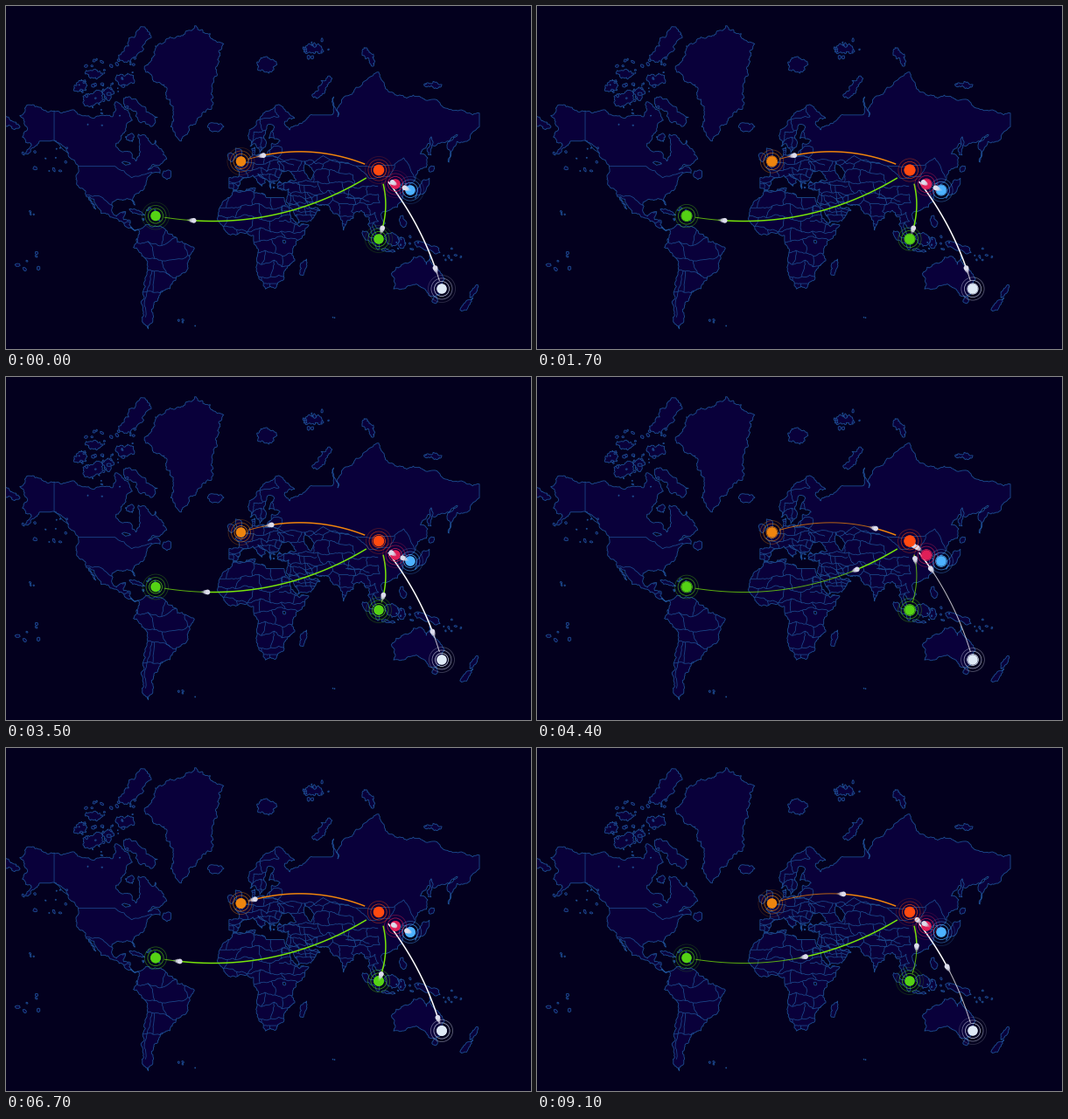
A matplotlib script that plays this animation: 600x393 px, repeating every 9200 ms.

```python
import math
import random

import matplotlib.pyplot as plt
import numpy as np
from matplotlib.animation import FuncAnimation
from matplotlib.collections import LineCollection, PolyCollection
from matplotlib.patches import Circle
from matplotlib.path import Path

W, H, DPI = 600, 393, 100
PX = 72 / DPI
FRAMES, STEP = 92, 100
SEA, LAND, EDGE = "#03001e", "#09003a", "#1d4f93"
rng = random.Random(7)

# Main coast points as lon, lat pairs; the fine coast is generated between them.
NORTH_AMERICA = [
    -141, 69.6, -125, 69.5, -115, 68.3, -97, 68, -95, 71.8, -85, 69.5, -82, 67, -87, 64.5,
    -94.5, 59, -92.5, 57, -82.5, 55, -79.5, 51.5, -76.6, 57, -77.5, 62.5, -70, 61, -66, 58.8,
    -64.5, 60.3, -56, 52.5, -66, 50, -70, 47.2, -65, 49, -61, 45.5, -70, 43.5, -76, 35.2,
    -81.3, 31, -80.1, 26, -84, 30, -97.3, 28, -97.7, 22.5, -94, 18.2, -90.4, 21, -87, 21.5,
    -88.5, 15.8, -83.5, 15, -83, 9.5, -77.3, 8.5, -80, 7.4, -92, 14.5, -105.5, 20.2,
    -114.7, 31.7, -109.6, 23.2, -117.2, 33, -124, 40, -122.7, 48, -134, 58, -144, 60, -152, 60,
    -163, 54.8, -158, 58.5, -165, 61.5, -161, 64.3, -167, 68.3, -157, 71.2]
SOUTH_AMERICA = [
    -77.3, 8.5, -72, 12, -62, 10.6, -52, 5, -48, -1, -35.2, -5.5, -39, -14, -41, -22, -48.6, -26,
    -53.5, -34, -57.5, -35, -62, -39, -67.5, -46, -68.3, -53, -70, -55.3, -74.5, -51.5, -73, -40,
    -70.3, -19, -81.2, -5, -77.5, 4]
EURASIA_NORTH = [
    -9, 37, -9, 43, -2, 43.4, -1.2, 46, -4.5, 48.4, 8.5, 53.8, 8.2, 57, 10.5, 57.6, 10, 54.3,
    19, 54.5, 23.5, 59.2, 29.5, 60, 21.3, 61, 25.2, 65, 22, 65.8, 17.3, 62, 18.8, 60, 14.2, 55.4,
    11, 59, 7, 58, 5.3, 62, 14.5, 67.8, 26, 71, 40.5, 67.6, 33, 66.6, 37, 64, 44, 66, 54, 68.5,
    68, 68.5, 70, 73, 73, 68, 76, 72, 87, 75, 104, 77.7, 113, 74, 127, 73, 139, 72.3, 160, 69.7,
    180, 69]
EURASIA_SOUTH = [
    180, 65, 171, 60, 163, 59.8, 157, 51, 156, 57, 163.5, 62.3, 154, 59.4, 142, 59.2, 135.5, 54.7,
    141, 53, 140, 48.5, 127.5, 39.6, 129.3, 36, 126.4, 34.5, 124.5, 40, 117.7, 39, 122, 37.2,
    121.8, 30, 118, 24.5, 108, 21.6, 105.8, 19, 109, 13, 105, 8.8, 100.5, 13.4, 99.3, 10,
    104.2, 1.4, 98.3, 8, 97, 17, 94, 18, 91, 22.4, 87, 21.4, 80.2, 15, 77.5, 8.1, 72.8, 20,
    66.7, 25.2, 57, 26.8, 48.5, 30, 51.5, 24.6, 59.8, 22.5, 55, 17.5, 43, 13, 34, 29, 36, 36.5,
    27.5, 37, 29, 41.1, 41.5, 41.5, 37.5, 46, 31, 46.6, 28, 41.5, 23.5, 40.5, 22.5, 36.6,
    19.3, 42, 12.7, 45, 18.4, 40.2, 15.8, 38.2, 9, 44.4, 3.2, 43, -2.2, 36.8]
AFRICA = [
    32.5, 31, 20, 31, 10.2, 34, 11, 37, -5.8, 35.8, -9.8, 31, -17, 21, -17.4, 14.7, -13, 8.8,
    -8, 4.4, 4.5, 6.3, 9.5, 4, 9.5, 0, 13.3, -7, 12, -15.5, 17, -30, 18.4, -34.2, 26, -33.8,
    32.7, -27, 35, -20, 40.6, -15, 39, -6, 48, 4.5, 51.2, 11.8, 44, 10.6, 37, 20, 33.5, 27.8]
AUSTRALIA = [
    142.5, -10.8, 146, -19, 153.5, -28, 150, -37.5, 143.5, -38.7, 138, -34, 131, -31.5,
    123.5, -34, 115.2, -34.2, 113.6, -24, 122.3, -17.5, 130, -12.5, 136.8, -12.2, 140, -17.6]
GREENLAND = [
    -73, 78.2, -58, 75.5, -51, 68.5, -53, 65, -45, 60, -39.5, 65, -22, 70.3, -19, 77, -13, 81.5,
    -35, 83.3, -62, 81.5]
BORDERS = [
    [-141, 69.6, -141, 60.3, -130, 55], [-123, 49, -95, 49, -82.5, 43, -71, 45.2, -67, 46],
    [-117, 32.5, -106, 31.7, -97.3, 26], [-67, -22, -72, -50],
    [23.5, 54, 31, 52, 40, 49.5], [47, 48, 62, 54, 87, 49.2, 116, 49.8, 123, 53, 131, 43],
    [87, 49.2, 97, 42.7, 112, 43.5, 116, 49.8], [79, 31, 97, 28.3]]

# Islands: x, y, half width, half height, tilt in degrees
ARCTIC_ISLES = [
    (155, 122, 23, 9, 38), (100, 107, 12, 9, 5), (86, 92, 7, 7, 0), (148, 46, 27, 12, -52),
    (137, 84, 12, 6, 0), (100, 78, 10, 5, 0), (117, 101, 6, 7, 0), (142, 150, 5, 4, 0),
    (297, 68, 10, 10, 0), (361, 94, 17, 5, -50), (352, 50, 13, 6, 0), (415, 58, 5, 11, -30),
    (488, 90, 9, 3, 0), (3, 134, 12, 5, 15)]
ISLES = [
    (240, 138, 9, 5, 0), (266, 173, 4, 11, -18), (257, 173, 4, 5, 0), (184, 193, 5, 5, 0),
    (149, 236, 9, 1.6, 20), (340, 299, 4, 11, 20), (490, 337, 3, 4, 0), (535, 327, 3, 8, 30),
    (526, 342, 3, 10, 45), (482, 277, 15, 5, 22), (441, 267, 8, 8, 0), (419, 269, 4, 15, -45),
    (436, 280, 8, 1.8, 8), (452, 272, 4, 6, 0), (453, 247, 3, 8, -15), (477, 207, 3.5, 14, 35),
    (486, 187, 4, 4, 0), (485, 162, 2, 11, 5)]
# Islet groups: x, y, spread, count
GROUPS = [(118, 80, 30, 26), (112, 112, 36, 16), (355, 48, 18, 12), (460, 274, 14, 12),
          (508, 284, 12, 8), (165, 238, 12, 9), (45, 172, 26, 12), (306, 205, 5, 6),
          (28, 292, 16, 6), (30, 237, 4, 3), (205, 366, 12, 4), (374, 356, 2, 2)]
# Areas filled with small states: left, top, right, bottom, cell size
STATES = [(240, 204, 352, 330, 13), (252, 163, 316, 212, 8), (312, 178, 392, 246, 12),
          (146, 250, 214, 332, 19), (394, 208, 424, 252, 10), (280, 112, 306, 164, 14),
          (130, 230, 152, 262, 9)]


def project(flat):
    lon, lat = np.array(flat, float).reshape(-1, 2).T
    y = 269 - 86.75 * np.log(np.tan(np.pi / 4 + np.radians(lat) / 2))
    return np.column_stack([268.5 + 1.514 * lon, y])


def roughen(points, levels=4, amount=0.22, closed=True):
    """Break each straight run into a jagged one by midpoint displacement."""
    pts = [tuple(p) for p in points]
    if closed:
        pts.append(pts[0])
    for _ in range(levels):
        out = [pts[0]]
        for (x0, y0), (x1, y1) in zip(pts, pts[1:]):
            length = math.hypot(x1 - x0, y1 - y0)
            if length > 1.5:
                seam = abs(x0 - x1) < 0.01 or abs(y0 - y1) < 0.01
                k = 0 if seam else rng.uniform(-1, 1) * min(amount, 3 / length)
                out.append(((x0 + x1) / 2 + k * (y1 - y0), (y0 + y1) / 2 - k * (x1 - x0)))
            out.append((x1, y1))
        pts = out
    return pts


def blob(x, y, rx, ry, tilt=0, sides=8):
    c, s = math.cos(math.radians(tilt)), math.sin(math.radians(tilt))
    for i in range(sides):
        k, a = rng.uniform(0.75, 1.2), math.tau * i / sides
        u, v = k * rx * math.cos(a), k * ry * math.sin(a)
        yield x + u * c - v * s, y + u * s + v * c


def islets(x, y, spread, count):
    for _ in range(count):
        r = rng.uniform(0.4, 2 if spread > 15 else 1.2)
        yield list(blob(x + rng.uniform(-spread, spread), y + rng.uniform(-spread, spread) * 0.7,
                        r * rng.uniform(0.7, 1.8), r, rng.uniform(0, 90), 6))


def state_lines(left, top, right, bottom, cell):
    """Jittered brick pattern: joined rows, with a wall at every second column."""
    cols, rows = round((right - left) / cell) + 1, round((bottom - top) / cell) + 1
    node = [[(left + cell * (c + rng.uniform(-0.33, 0.33)), top + cell * (r + rng.uniform(-0.33, 0.33)))
             for c in range(cols)] for r in range(rows)]
    for r in range(rows):
        for c in range(cols):
            if c + 1 < cols:
                yield roughen([node[r][c], node[r][c + 1]], 3, 0.15, False)
            if r + 1 < rows and (r + c) % 2 == 0:
                yield roughen([node[r][c], node[r + 1][c]], 3, 0.15, False)


fig = plt.figure(figsize=(W / DPI, H / DPI), dpi=DPI, facecolor=SEA)
ax = fig.add_axes([0, 0, 1, 1])
ax.set_xlim(0, W)
ax.set_ylim(H, 0)
ax.axis("off")


def add_areas(areas, fill, z):
    ax.add_collection(PolyCollection(areas, facecolor=fill, edgecolor=EDGE, linewidth=0.85 * PX, zorder=z))


def add_borders(lines):
    return ax.add_collection(LineCollection(lines, colors=EDGE, linewidths=0.75 * PX, zorder=2))


mainland = [roughen(project(c)) for c in (NORTH_AMERICA, SOUTH_AMERICA, EURASIA_NORTH + EURASIA_SOUTH,
                                          AFRICA, AUSTRALIA)]
land = mainland + [roughen(project(GREENLAND), 5, 0.3)]
land += [roughen(blob(*isle), 3, 0.4) for isle in ARCTIC_ISLES]
land += [roughen(blob(*isle), 2, 0.25) for isle in ISLES]
for group in GROUPS:
    land += islets(*group)
add_areas(land, LAND, 1)
add_areas([roughen(blob(346, 190, 5, 11, -20), 2), roughen(blob(137, 180, 5, 2, 10), 2),
           roughen(blob(318, 270, 2, 2), 1)], SEA, 3)
add_borders([roughen(project(b), 4, 0.1, False) for b in BORDERS])
states = add_borders([line for area in STATES for line in state_lines(*area)])
states.set_clip_path(Path.make_compound_path(*[Path(m, closed=True) for m in mainland]), ax.transData)

HUB = np.array([426, 188.0])
HUB_COLOR = "#ff4a10"
# Place, bend of the path, dot colour, line colour (None: too short to show)
ROUTES = [((171, 240.5), -0.2, "#55d214", "#78e60a"), ((268.5, 178), 0.2, "#ee850f", "#f0850c"),
          ((498, 324), -0.11, "#dfeaf6", "#ffffff"), ((426, 267), -0.2, "#55d214", "#78e60a"),
          ((462, 211), 0.1, "#4db2ff", None), ((445, 204), 0.1, "#e01f58", None)]


class Route:
    def __init__(self, place, bend, line_color):
        self.a = np.array(place, float)
        dx, dy = HUB - self.a
        self.length = math.hypot(dx, dy)
        self.c = (self.a + HUB) / 2 + bend * np.array([dy, -dx])
        self.lines = []
        if line_color:
            self.u = np.linspace(0, 1, 160)
            self.path = self.at(self.u[:, None])
            self.shown = ((np.hypot(*(self.path - self.a).T) > 9)
                          & (np.hypot(*(self.path - HUB).T) > 17))
            self.lines = [ax.plot([], [], color=line_color, lw=w * PX, alpha=o, zorder=4)[0]
                          for w, o in ((1.0, 0.75), (1.5, 1))]
        self.tail = [ax.add_patch(Circle(self.a, r, fc="#dcdcec", ec="none", alpha=o, zorder=7))
                     for r, o in ((2.9, 1), (2.5, 0.75), (1.8, 0.4), (1.2, 0.2))]

    def at(self, u):
        return (1 - u) ** 2 * self.a + 2 * u * (1 - u) * self.c + u ** 2 * HUB

    def update(self, u):
        for i, dot in enumerate(self.tail):
            dot.center = self.at(max(u - i * 2.2 / self.length, 0))
        if self.lines:
            for line, side in zip(self.lines, (self.u <= u, self.u >= u)):
                line.set_data(*self.path[self.shown & side].T)


def add_spot(center, color, radius, z):
    ax.add_patch(Circle(center, radius, fc=color, ec="none", zorder=z))
    return [ax.add_patch(Circle(center, 8, fc="none", ec=color, lw=0.8 * PX, zorder=z - 1))
            for _ in range(3)]


routes = [Route(place, bend, line) for place, bend, _, line in ROUTES]
spots = [add_spot(place, color, 5.8, 6) for place, _, color, _ in ROUTES]
spots.append(add_spot(HUB, HUB_COLOR, 6.3, 9))


def update(frame):
    u = (0.16 + frame / 17) % 1
    for route in routes:
        route.update(u)
    phase = (0.87 + frame / 13) % 1
    for rings in spots:
        for i, ring in enumerate(rings):
            ring.set_radius(5.5 + 3.5 * (phase + i))
            ring.set_alpha(1 - (phase + i) / 3.6)
    return []


anim = FuncAnimation(fig, update, frames=FRAMES, interval=STEP, repeat=True, repeat_delay=0, blit=False)
plt.show()
```
